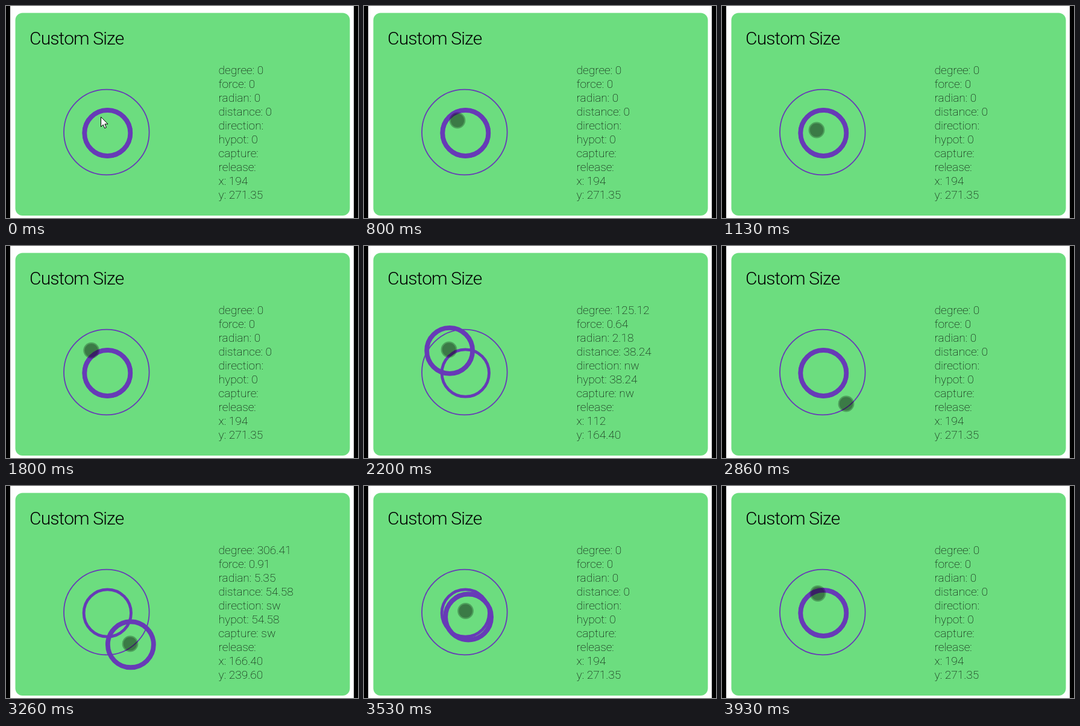
Write an HTML page that moves like this. It is 584x352 px and loops after 4.26 s.

```html
<!DOCTYPE html>
<html lang="en">
<head>
<meta charset="utf-8">
<title>Joystick demo</title>
<style>
  html, body { margin: 0; width: 100%; height: 100%; overflow: hidden; background: #000; }
  svg { display: block; width: 584px; height: 352px; }
  text { font-family: Roboto, sans-serif; fill: #000; white-space: pre; }
  .title { font-size: 30px; font-weight: 300; letter-spacing: -0.85px; }
  .row { font-size: 19.2px; font-weight: 100; }
  .ring { fill: none; stroke: #673ab7; }
</style>
</head>
<body>
<svg viewBox="0 0 584 352">
  <rect x="7" width="570" height="352" fill="#fff"/>
  <rect x="15.5" y="11.5" width="555" height="336.5" rx="12" fill="#6cdd7f"/>
  <text class="title" x="39" y="63.8">Custom Size</text>
  <g id="rows"></g>
  <circle class="ring" cx="166.8" cy="209.5" r="70.8" stroke-width="1.8"/>
  <circle class="ring" cx="168.3" cy="211" r="39.2" stroke-width="4.8"/>
  <circle class="ring" id="stick" cx="168.3" cy="211" r="38" stroke-width="7.8"/>
  <g id="touch">
    <circle r="13.4" fill-opacity=".27"/>
    <circle r="11.2" fill-opacity=".24"/>
  </g>
  <path id="arrow" d="M157.5 184.2v16.3l3.7-3.5 2.5 5.9 2.7-1.1-2.5-5.8h5.2z"
        fill="#fff" stroke="#000" stroke-linejoin="round"/>
</svg>
<script>
const LOOP = 4260;
const SCALE = 1.19;           // stage pixels per joystick unit
const MAX_DISTANCE = 60;
const CENTER = { x: 134, y: 195.676 };
const IDLE = { x: 194, y: 271.35 };

// the touch point appears, then eases to each place in turn (times in ticks)
const appear = { tick: 12, x: 155, y: 190 };
const moves = [
  { from: 12, to: 17, x: 157, y: 206 },
  { from: 23, to: 28, x: 141, y: 172 },
  { from: 34, to: 40, x: 209.5, y: 264.5 },
  { from: 41, to: 43, x: 206, y: 262 },
  { from: 50, to: 53, x: 168.5, y: 207.5 },
  { from: 53, to: 59, x: 159, y: 178.5 }
];

const presses = [
  { tick: 31, distance: 38.24, degree: 125.12, direction: 'nw' },
  { tick: 47, distance: 54.58, degree: 306.41, direction: 'sw' }
];
const HOLD = 3.4, RETURN = 4.6;   // ticks

const labels = ['degree', 'force', 'radian', 'distance', 'direction',
                'hypot', 'capture', 'release', 'x', 'y'];

const byId = id => document.getElementById(id);
const stick = byId('stick'), touch = byId('touch'), arrow = byId('arrow');

const rows = labels.map((label, i) => {
  const row = document.createElementNS('http://www.w3.org/2000/svg', 'text');
  row.setAttribute('class', 'row');
  row.setAttribute('x', 352.5);
  row.setAttribute('y', 112.8 + 23 * i);
  byId('rows').append(row);
  return row;
});

const format = n => n.toFixed(2).replace(/\.00$/, '');
const clamp = p => Math.min(1, Math.max(0, p));
const easeOut = (p, power = 2) => 1 - (1 - clamp(p)) ** power;
const startOf = tick => Math.floor(tick * 20 / 3) * 10;

// 15 ticks per second, each starting on a multiple of 10 ms
function tickAt(ms) {
  const tick = Math.floor(ms * 0.015);
  return startOf(tick + 1) <= ms ? tick + 1 : tick;
}

function touchAt(tick) {
  let { x, y } = appear;
  for (const move of moves) {
    const p = easeOut((tick - move.from) / (move.to - move.from));
    x += (move.x - x) * p;
    y += (move.y - y) * p;
  }
  return { x, y };
}

// share of the full offset: quick pull, then a spring back
function reachAt(age) {
  return age < HOLD ? easeOut((age + 1) / 3) : 1 - easeOut((age - HOLD) / RETURN, 2.5);
}

function offsetOf({ distance, degree }) {
  const angle = degree * Math.PI / 180;
  return { x: distance * Math.cos(angle), y: -distance * Math.sin(angle) };
}

function readings(press) {
  if (!press) return [0, 0, 0, 0, '', 0, '', '', IDLE.x, IDLE.y];
  const { distance, degree, direction } = press;
  const { x, y } = offsetOf(press);
  return [
    format(degree), format(distance / MAX_DISTANCE), format(degree * Math.PI / 180),
    format(distance), direction, format(distance), direction, '',
    format(CENTER.x + x), format(CENTER.y + y)
  ];
}

const moveTo = (node, { x, y }) => node.setAttribute('transform', `translate(${x} ${y})`);

function draw(tick) {
  const press = presses.find(p => tick >= p.tick && tick < p.tick + HOLD + RETURN);
  const age = press ? tick - press.tick : 0;
  const offset = press ? offsetOf(press) : { x: 0, y: 0 };
  const reach = SCALE * reachAt(age);
  moveTo(stick, { x: offset.x * reach, y: offset.y * reach });

  const values = readings(age < HOLD ? press : null);
  rows.forEach((row, i) => { row.textContent = `${labels[i]}: ${values[i]}`; });

  const touching = tick >= appear.tick;
  arrow.style.display = touching ? 'none' : '';
  touch.style.display = touching ? '' : 'none';
  moveTo(touch, touchAt(tick));
}

const start = performance.now();
let shown = -1;
function frame() {
  const tick = tickAt((performance.now() - start) % LOOP);
  if (tick !== shown) draw(shown = tick);
  requestAnimationFrame(frame);
}
frame();
</script>
</body>
</html>
```
